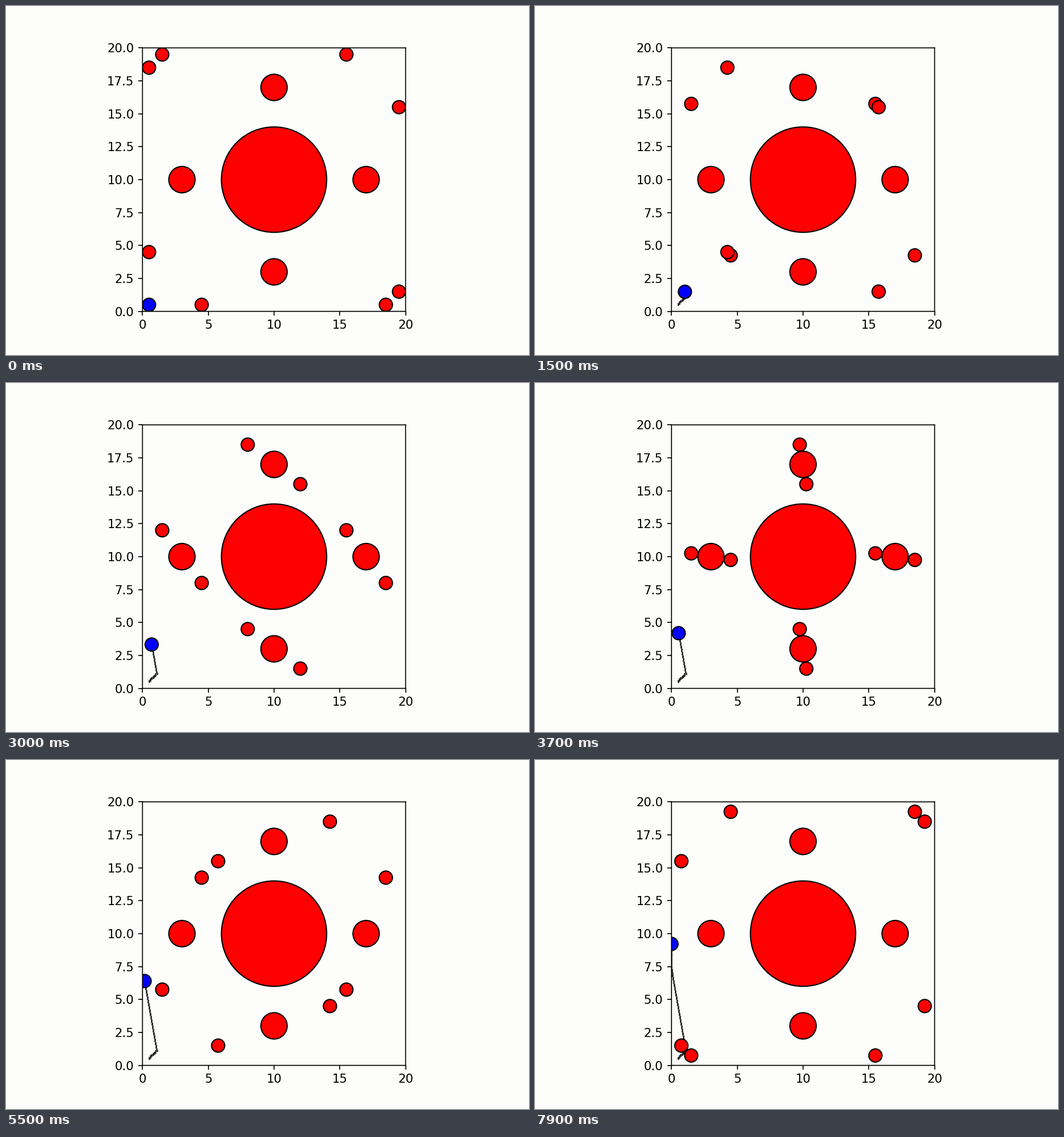
Animation, 917 px wide and 611 px high, one loop 8 s. Source, as a matplotlib script:

```python
import numpy as np
import matplotlib.pyplot as plt
from matplotlib.animation import FuncAnimation
from matplotlib.patches import Circle

W, H, DPI = 917, 611, 152.8
FRAMES, INTERVAL = 80, 100
SIZE = 20
PAPER = "#fdfefb"
STEP, TURN = 0.25, 77  # obstacle speed per frame, frame of the bounce

fig = plt.figure(figsize=(W / DPI, H / DPI), dpi=DPI, facecolor=PAPER)
ax = fig.add_axes([0.125, 0.125, 0.775, 0.755], facecolor=PAPER)
ax.set_aspect("equal")
ax.set_xlim(0, SIZE)
ax.set_ylim(0, SIZE)
ax.set_xticks(np.arange(0, 21, 5))
ax.set_yticks(np.arange(0, 20.1, 2.5))
ax.yaxis.set_major_formatter("{x:.1f}")
ax.tick_params(labelsize=10)
for line in [*ax.spines.values(), *ax.get_xticklines(), *ax.get_yticklines()]:
    line.set_snap(False)


def disc(x, y, r, color="red"):
    return ax.add_patch(Circle((x, y), r, fc=color, ec="black", lw=1))


def robot_path():
    """Staircase out of the corner, a straight run to the wall, then along it."""
    k = np.arange(FRAMES)
    x = np.interp(k, [12, 15, 62.4], [1.1, 1.02, 0])
    y = np.interp(k, [12, 15, 62.4, 79], [1.1, 1.487, 7.31, 9.215])
    stairs = k < 12
    x[stairs] = 0.5 + 0.1 * (k[stairs] // 2)
    y[stairs] = 0.5 + 0.1 * ((k[stairs] + 1) // 2)
    return x, y


path_x, path_y = robot_path()
trail, = ax.plot([], [], "o", color="#222222", ms=1.5, mew=0, zorder=0.5)
trail.set_snap(False)

disc(10, 10, 4)
for x, y in [(10, 3), (10, 17), (3, 10), (17, 10)]:
    disc(x, y, 1)

# (fixed coordinate, direction of travel)
lanes = [(1.5, -1), (4.5, 1), (15.5, -1), (18.5, 1)]
columns = [(disc(c, 0, 0.5), c, d) for c, d in lanes]
rows = [(disc(0, c, 0.5), c, d) for c, d in lanes]
robot = disc(0.5, 0.5, 0.5, "blue")


def draw(k):
    s = STEP * (k if k <= TURN else 2 * TURN - k)

    def along(d):
        return 0.5 + s if d > 0 else SIZE - 0.5 - s

    for patch, c, d in columns:
        patch.center = c, along(d)
    for patch, c, d in rows:
        patch.center = along(d), c
    robot.center = path_x[k], path_y[k]
    trail.set_data(path_x[:k + 1], path_y[:k + 1])
    return [trail, robot]


anim = FuncAnimation(fig, draw, frames=FRAMES, interval=INTERVAL,
                     init_func=lambda: draw(0), repeat=True, repeat_delay=0)
plt.show()
```
